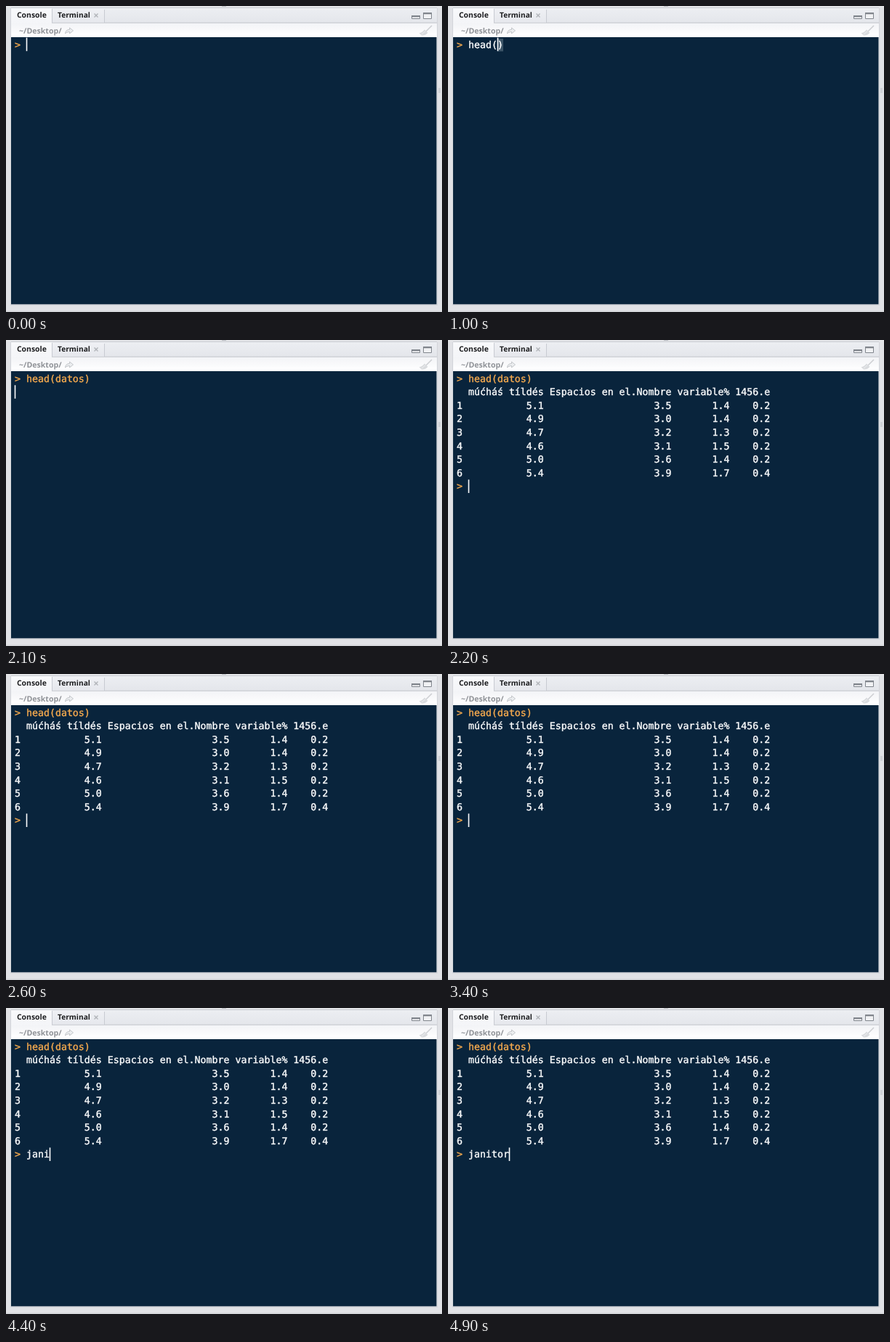
These frames come from a looping animation (600x422 px, 5 s). An HTML page with a canvas:

```html
<!DOCTYPE html>
<html lang="es">
<head>
<meta charset="utf-8">
<title>Console</title>
<style>
  html, body { margin: 0; width: 100%; height: 100%; overflow: hidden; background: #e1e2e6; }
  canvas { display: block; width: 600px; height: 422px; }
</style>
</head>
<body>
<canvas id="stage" width="600" height="422"></canvas>
<script>
const ctx = document.getElementById('stage').getContext('2d');
const LOOP = 5000;
const MONO = '13.288px "DejaVu Sans Mono", "Noto Sans Mono", monospace';
const LABEL = '"Open Sans", "Noto Sans", sans-serif';
const ORANGE = '#f3a94e', WHITE = '#fbfcfd', NAVY = '#09243c';
const LEFT = 12, CHAR = 8, BASE = 57.6, LINE = 18.6;

const TABLE = [
  '  múćháś tíldés Espacios en el.Nombre variable% 1456.e',
  ...['5.1 3.5 1.4 0.2', '4.9 3.0 1.4 0.2', '4.7 3.2 1.3 0.2',
      '4.6 3.1 1.5 0.2', '5.0 3.6 1.4 0.2', '5.4 3.9 1.7 0.4'].map(tableRow)
];

// Start time, typed text, cursor column within it
const FIRST = [
  [0, '', 0], [500, 'h', 1], [600, 'he', 2], [700, 'hea', 3], [800, 'head', 4],
  [900, 'head()', 5], [1100, 'head(d)', 6], [1300, 'head(da)', 7],
  [1400, 'head(dat)', 8], [1600, 'head(dato)', 9], [1700, 'head(datos)', 10],
  [1800, 'head(datos)', 11]
];
const SECOND = [
  [0, '', 0], [4100, 'j', 1], [4200, 'ja', 2], [4300, 'jan', 3], [4400, 'jani', 4],
  [4600, 'janit', 5], [4700, 'janito', 6], [4800, 'janitor', 7]
];
const RUN = 2000, OUTPUT = 2200;
const BLINKS = [[200, 500], [2700, 3200], [3700, 4100]];

function tableRow(values, i) {
  const widths = [14, 22, 10, 7];
  return (i + 1) + values.split(' ').map((v, k) => v.padStart(widths[k])).join('');
}

function rect(x, y, w, h, color) {
  ctx.fillStyle = color;
  ctx.fillRect(x, y, w, h);
}

function fade(x, y, w, h, top, bottom) {
  const g = ctx.createLinearGradient(0, y, 0, y + h);
  g.addColorStop(0, top);
  g.addColorStop(1, bottom);
  rect(x, y, w, h, g);
}

function text(str, x, y, color, font) {
  ctx.font = font;
  ctx.fillStyle = color;
  ctx.fillText(str, x, y);
}

function path(points, color, width = 1) {
  ctx.beginPath();
  points.forEach(([x, y], i) => i ? ctx.lineTo(x, y) : ctx.moveTo(x, y));
  ctx.strokeStyle = color;
  ctx.lineWidth = width;
  ctx.stroke();
}

// Console text is a little heavier than the regular weight
function print(str, row, color, col = 0) {
  const x = LEFT + col * CHAR, y = BASE + row * LINE;
  text(str, x, y, color, MONO);
  ctx.strokeStyle = color;
  ctx.lineWidth = 0.4;
  ctx.lineJoin = 'round';
  ctx.strokeText(str, x, y);
}

function cursor(col, row) {
  rect(LEFT - 0.3 + col * CHAR, 43.7 + row * LINE, 1.6, 18.5, WHITE);
}

function drawArrow() {
  ctx.beginPath();
  ctx.moveTo(81.5, 38);
  ctx.quadraticCurveTo(82, 32.5, 87.5, 32.5);
  ctx.lineTo(87.5, 30);
  ctx.lineTo(92.5, 34);
  ctx.lineTo(87.5, 38);
  ctx.lineTo(87.5, 35.5);
  ctx.quadraticCurveTo(83.5, 35.5, 81.5, 38);
  ctx.fillStyle = '#eceef0';
  ctx.fill();
  ctx.strokeStyle = '#c3c6ca';
  ctx.lineWidth = 1;
  ctx.stroke();
}

function drawBroom() {
  path([[586, 27], [578, 35]], '#cdcfd3', 1.6);
  ctx.beginPath();
  ctx.moveTo(576, 32.5);
  ctx.lineTo(580.5, 37);
  ctx.quadraticCurveTo(577, 41, 572, 40.5);
  ctx.lineTo(568.5, 37.5);
  ctx.quadraticCurveTo(573, 36.5, 576, 32.5);
  ctx.fillStyle = '#d9dbde';
  ctx.fill();
  path([[572, 39], [577, 35]], '#eef0f1');
}

function paneButton(x, y, w, h) {
  rect(x, y, w, h, '#f1f2f4');
  ctx.strokeStyle = '#80858c';
  ctx.lineWidth = 1;
  ctx.strokeRect(x + 0.5, y + 0.5, w - 1, h - 1);
  rect(x, y, w, 2.3, '#80858c');
}

function drawWindow() {
  rect(0, 0, 600, 422, '#e1e2e6');
  rect(0, 0, 600, 2, '#e5e6e9');
  rect(297, 0, 6, 1, '#b9bcc2');
  rect(595, 113, 3, 7, '#cfd1d6');
  rect(0, 420.5, 600, 1.5, '#d3d5d9');

  // Soft edge around the pane
  rect(6, 3, 588, 410, '#d3d5da');
  rect(7, 2, 586, 1, '#c9ccd2');

  fade(7, 3, 586, 20, '#eceef2', '#e4e6eb');
  rect(7, 22.5, 586, 1, '#cfd2d8');
  fade(64, 4, 71, 18.5, '#eff0f4', '#e6e8ed');
  fade(7, 3, 56, 21, '#f8f9fb', '#f4f5f8');
  rect(63, 4, 1, 19, '#c8cbd2');
  rect(135, 5, 1, 18, '#c8cbd2');

  fade(7, 24, 586, 19, '#f3f4f7', '#ffffff');
  rect(7, 37, 586, 5, '#fdfdfe');

  text('Console', 15, 16, '#1d1e20', 'bold 10.4px ' + LABEL);
  text('Terminal', 71, 16, '#1d1e20', 'bold 10.2px ' + LABEL);
  path([[121.5, 10.5], [126.5, 15.5]], '#b2b5ba', 1.4);
  path([[126.5, 10.5], [121.5, 15.5]], '#b2b5ba', 1.4);
  text('~/Desktop/', 18, 38.3, '#909398', 'bold 10.6px ' + LABEL);
  drawArrow();
  drawBroom();
  paneButton(558, 13, 12, 5);
  paneButton(574, 9, 12, 9);

  rect(7, 43, 585.4, 368.3, NAVY);
}

function drawPrompt(steps, t, row) {
  const [, typed, col] = steps.filter(s => s[0] <= t).pop();
  print('>', row, ORANGE);
  if (typed === 'head()') rect(LEFT + 7 * CHAR, 45, CHAR, 17.5, '#3d5568');
  print(typed, row, WHITE, 2);
  if (!BLINKS.some(([a, b]) => t >= a && t < b)) cursor(2 + col, row);
}

function draw(t) {
  drawWindow();
  if (t < RUN) {
    drawPrompt(FIRST, t, 0);
    return;
  }
  print('> head(datos)', 0, ORANGE);
  if (t < OUTPUT) {
    cursor(0, 1);
    return;
  }
  TABLE.forEach((line, i) => print(line, i + 1, WHITE));
  drawPrompt(SECOND, t, 8);
}

ctx.textRendering = 'geometricPrecision';
const start = performance.now();
function tick() {
  draw((performance.now() - start) % LOOP);
  requestAnimationFrame(tick);
}
tick();
</script>
</body>
</html>
```
